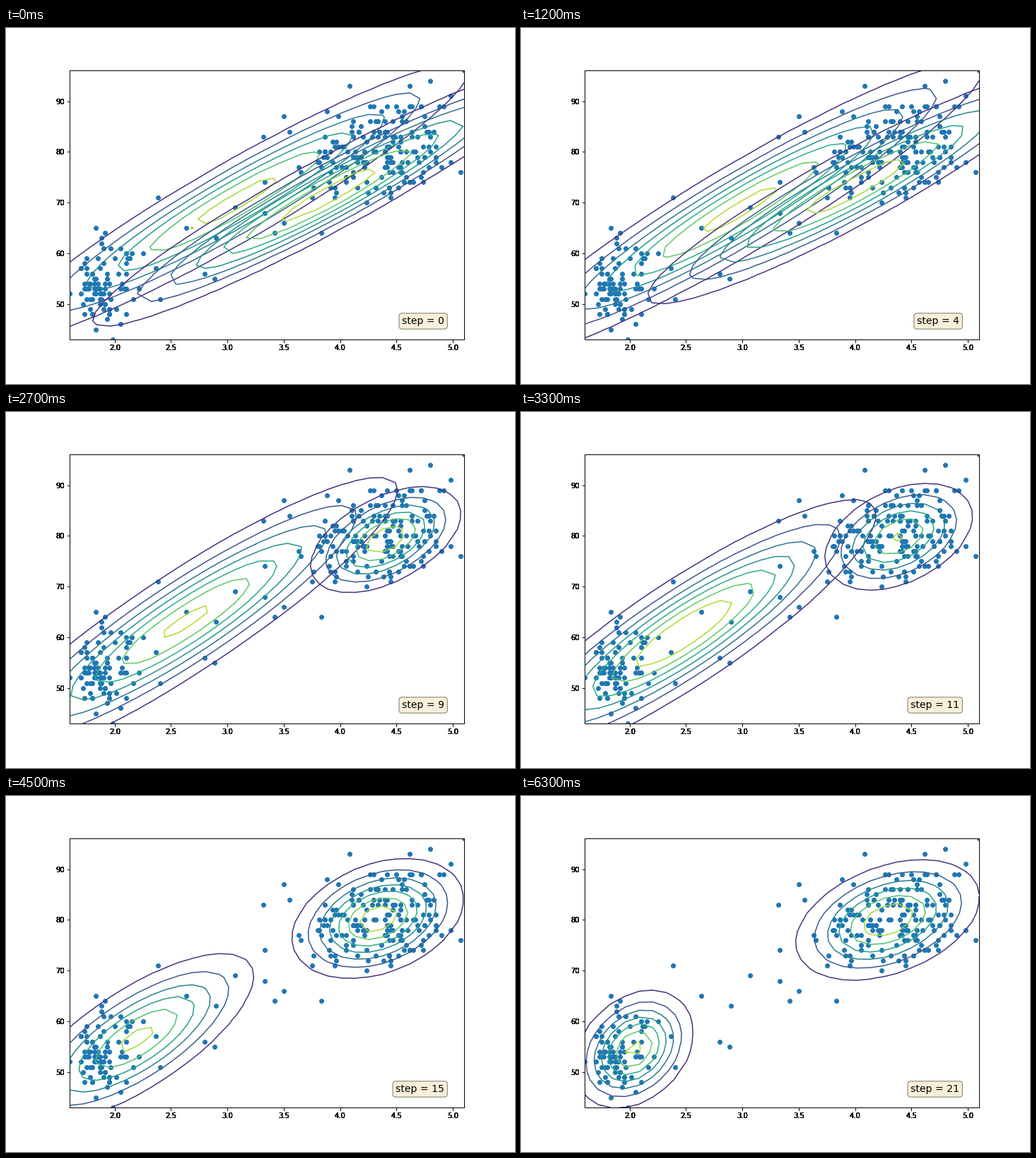
These frames come from a looping animation (720 by 504 pixels, 6600 ms). A matplotlib script:

```python
import numpy as np
import matplotlib.pyplot as plt
from matplotlib.animation import FuncAnimation

STEPS = 22
X_RANGE, Y_RANGE = (1.6, 5.1), (43, 96)

plt.rcParams.update({"font.family": "DejaVu Sans", "font.size": 10})

# Moments of the whole data set, kept by the mixture at every step
MEAN = np.array([3.4878, 70.897])
COV = np.array([[1.298, 13.93], [13.93, 184.14]])

# Upper cluster at the turning points of the fit:
# mean x, mean y, variance x, variance y, covariance, weight of the lower one
START = np.array([3.908, 71.66, 1.086, 167.4, 12.84, .5])
SPLIT = np.array([4.404, 79.24, .1136, 27.98, .891, .5175])
TIGHT = np.array([4.368, 80.45, .118, 32.26, .56, .424])
FINAL = np.array([4.290, 79.97, .170, 36.05, .9406, .356])


def mix(a, b, t):
    return a + (b - a) * t


def upper_cluster(step):
    """Accelerating split, steady tightening, then a soft settling."""
    if step <= 9:
        return mix(START, SPLIT, (step / 9) ** 2)
    if step <= 13:
        return mix(SPLIT, TIGHT, (step - 9) / 4)
    t = min((step - 13) / 4.5, 1)
    return mix(TIGHT, FINAL, t * t * (3 - 2 * t))


def clusters(step):
    """Mean and covariance of both; the lower one is what the upper leaves."""
    mx, my, vx, vy, cxy, w = upper_cluster(step)
    mean_up, cov_up = np.array([mx, my]), np.array([[vx, cxy], [cxy, vy]])
    mean_low = (MEAN - (1 - w) * mean_up) / w
    gap = mean_up - mean_low
    spread = w * (1 - w) * np.outer(gap, gap)
    cov_low = (COV - spread - (1 - w) * cov_up) / w
    return (mean_low, cov_low), (mean_up, cov_up)


def density(mean, cov):
    offset = GRID - mean
    q = np.einsum("...i,ij,...j", offset, np.linalg.inv(cov), offset)
    return np.exp(-q / 2) / (2 * np.pi * np.sqrt(np.linalg.det(cov)))


def cloud(count, x, slope, center, noise, low, high):
    """Points scattered about a line, on the recording grid, within a box."""
    y = center[1] + slope * (x - center[0]) + rng.normal(0, noise, x.size)
    points = np.column_stack([np.round(x * 60) / 60, np.round(y)])
    inside = np.all((points >= low) & (points <= high), axis=1)
    return points[inside][:count]


GX, GY = np.meshgrid(np.linspace(*X_RANGE, 30), np.linspace(*Y_RANGE, 30))
GRID = np.dstack([GX, GY])

rng = np.random.default_rng(7)
loners = [(1.6, 52), (1.983, 43), (2.383, 71), (2.633, 65), (2.9, 63),
          (2.8, 56), (2.883, 55), (3.067, 69), (3.333, 74), (3.333, 68),
          (3.5, 66), (3.417, 64), (3.833, 64), (3.317, 83), (3.5, 87),
          (4.083, 93), (4.617, 93), (4.8, 94), (5.1, 96), (5.067, 76)]
points = np.vstack([
    loners,
    cloud(86, 1.68 + rng.gamma(1.8, .17, 400), 6, (2.0, 54.5), 5,
          (1.7, 45), (2.5, 65)),
    cloud(166, rng.normal(4.34, .32, 800), 5, (4.34, 80), 5,
          (3.55, 70), (5.0, 91)),
])

fig = plt.figure(figsize=(10, 7), dpi=72, facecolor="white")

# Stacked empty axes make the ticks and labels look heavier
for _ in range(8):
    ax = fig.add_axes([.125, .125, .775, .755], facecolor="none")
    ax.set(xlim=X_RANGE, ylim=Y_RANGE)

ax.scatter(*points.T, s=36, color="#1f77b4")
label = ax.text(.95, .05, "", transform=ax.transAxes, fontsize=14,
                ha="right", va="bottom",
                bbox=dict(boxstyle="round", facecolor="wheat", alpha=.5))
contours = []


def update(step):
    while contours:
        contours.pop().remove()
    for mean, cov in clusters(step):
        contours.append(ax.contour(GX, GY, density(mean, cov),
                                   cmap="viridis"))
    label.set_text(f"step = {step}")
    return [label]


anim = FuncAnimation(fig, update, frames=STEPS, interval=300,
                     init_func=lambda: [], repeat=True, repeat_delay=0)
plt.show()
```
